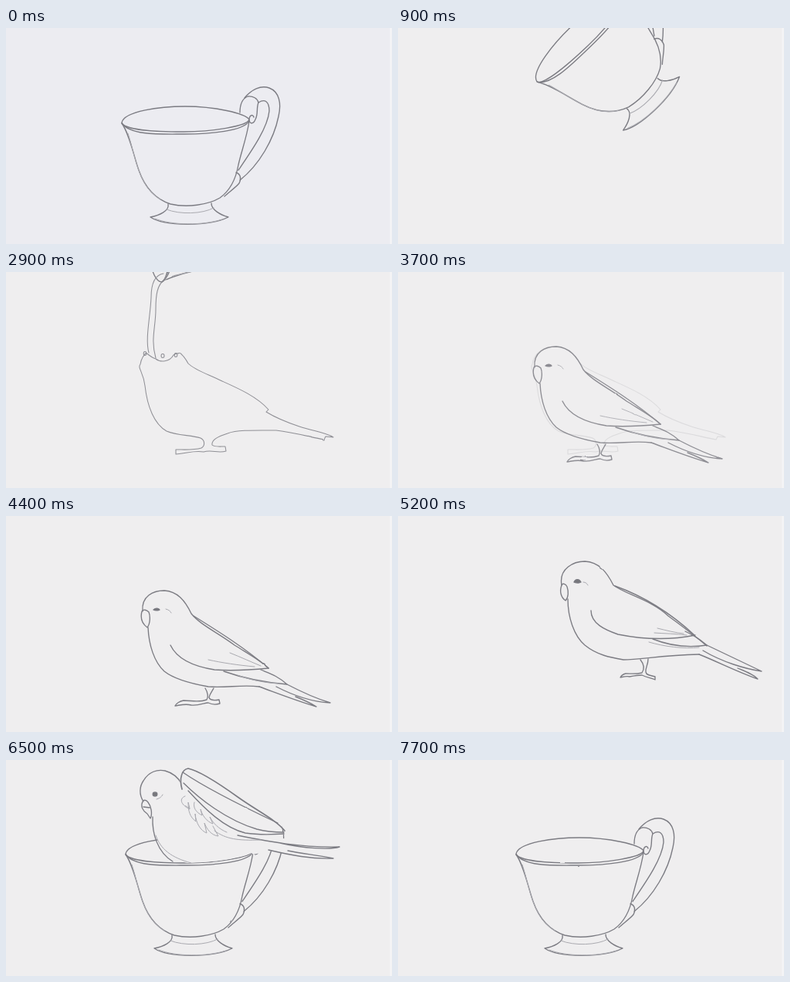
Write an HTML page that moves like this. It is 500 px wide and 281 px high and loops after 7.8 s.

```html
<!DOCTYPE html>
<html lang="en">
<head>
<meta charset="utf-8">
<title>Cup and bird</title>
<style>
html, body { margin: 0; width: 100%; height: 100%; overflow: hidden; background: #efeeef; }
svg { display: block; width: 100vw; height: 100vh; }
path, ellipse { fill: none; stroke: #7b7b82; stroke-width: 1.35; stroke-linecap: round; stroke-linejoin: round; }
.soft { stroke: #a9a9af; stroke-width: 1; }
.thin { stroke: #8f8f95; stroke-width: 1.05; }
.dark { fill: #77777c; }
.paper { fill: #efeeef; stroke: none; }
</style>
</head>
<body>
<svg viewBox="0 0 500 281" preserveAspectRatio="none">
  <defs>
    <filter id="pencil" filterUnits="userSpaceOnUse" x="0" y="0" width="500" height="281" color-interpolation-filters="sRGB">
      <feTurbulence id="grain" type="fractalNoise" baseFrequency=".04" numOctaves="2"/>
      <feDisplacementMap in="SourceGraphic" scale="1.5" xChannelSelector="R" yChannelSelector="G"/>
    </filter>
    <clipPath id="belowSurface"><path id="poolClip"/></clipPath>
    <clipPath id="insideBird"><path id="mouldClip"/></clipPath>
    <clipPath id="streamSpan"><rect id="streamRect" x="100" width="200"/></clipPath>
    <clipPath id="aboveRim"><path d="M0 0H500V140H340L318 121C290 135 190 140 155 125H0Z"/></clipPath>
  </defs>
  <rect id="paper" width="500" height="281"/>
  <path d="M498.5 0V281" style="stroke:#f5f5f7;stroke-width:2"/>
  <g filter="url(#pencil)">
    <g id="cup">
      <path d="M150 123C153 108 200 102 232 102C270 102 310 111 315 119C313 128 265 135 230 135C190 135 152 132 150 123"/>
      <path d="M150 124C162 140 200 138 230 138C265 138 308 134 315 121"/>
      <path d="M150 124C160 138 165 165 172 185C179 205 192 222 213 229C235 234 262 230 277 221C291 211 298 195 301 178C305 160 312 142 315 121"/>
      <path class="soft" d="M158 137C164 155 168 180 177 197C182 208 190 217 200 223"/>
      <path d="M210 229C212 238 198 244 187 246C205 258 262 259 288 246C277 243 266 236 266 228"/>
      <path class="soft" d="M208 236C225 243 255 242 269 234M193 248C215 257 255 257 280 249"/>
      <path d="M309 91C318 80 330 74 341 78C354 83 357 98 353 115C347 145 328 178 303 198"/>
      <path d="M327 97C335 92 341 95 341 108C339 130 318 160 301 185"/>
      <path d="M303 110C303 100 306 92 313 89C320 88 326 92 327 97C324 104 327 112 323 119C320 126 315 125 315 118C316 113 320 112 321 116"/>
      <path d="M298 188C304 190 305 196 302 202C297 208 288 214 283 219"/>
    </g>
    <g id="liquid">
      <g clip-path="url(#belowSurface)"><path id="mould" class="thin"/></g>
      <g clip-path="url(#insideBird)"><path id="surface" class="thin"/></g>
      <g id="bubbles"></g>
    </g>
    <g clip-path="url(#streamSpan)"><path id="stream" class="thin"/></g>
    <g id="bird"></g>
    <g id="perchClip">
      <g id="perch">
        <path class="paper" d="M190 75C174 62 170 40 178 28C185 15 196 12 205 14C216 17 224 24 230 38L330 66L356 74L359 102L432 113L422 128C390 126 370 124 345 118C320 122 280 134 240 135C205 130 189 100 190 75Z"/>
        <path d="M178 54C172 45 173 34 178 27C185 15 196 12 206 14C217 17 224 24 228 32M190 74C189 95 196 120 216 132"/>
        <path class="soft" d="M194 98C200 116 214 127 240 134M203 45C201 49 198 50 195 51"/>
        <path d="M177 54C174 60 177 66 183 70L187 76C190 70 188 60 184 55C181 51 178 52 177 54M178 61L186 62"/>
        <ellipse class="dark" cx="193" cy="44.500" rx="2.800" ry="2.600"/>
        <path d="M300 98C340 106 380 114 432 113C420 117 385 115 355 108M340 117C370 124 395 129 424 128C405 124 385 122 365 118"/>
        <path class="soft" d="M270 92C285 103 300 105 330 104"/>
        <g id="wing">
          <path class="paper" d="M226 36C224 22 228 12 236 11C250 14 275 30 300 48C325 66 350 80 360 97C330 102 295 96 270 80Z"/>
          <path style="stroke-width:1.7" d="M228 38C224 24 228 12 236 11C250 14 275 30 300 48C325 66 350 78 361 92"/>
          <path d="M229 16C255 34 310 62 352 82M230 30C250 50 285 78 325 90C340 94 350 94 360 94M236 40C258 64 282 88 310 95C330 98 345 97 360 96"/>
          <path class="soft" d="M232 47C224 50 226 58 238 64L236 56C236 66 238 74 246 80L245 70C246 82 252 92 260 95L257 82C260 90 266 98 275 99L268 86M244 55C242 62 246 68 254 72L252 64C254 72 260 80 268 83L264 74C268 82 276 90 286 94"/>
        </g>
      </g>
    </g>
  </g>
</svg>
<script>
const LOOP = 7800, STEP = 100;
const $ = id => document.getElementById(id);
const set = (el, attrs) => { for (const k in attrs) el.setAttribute(k, attrs[k]); };
const show = (el, opacity) => set(el, { opacity, display: opacity > 0 ? 'inline' : 'none' });
const lerp = (a, b, k) => a + (b - a) * k;
const span = (t, a, b) => Math.min(1, Math.max(0, (t - a) / (b - a)));
const ease = k => k * k * (3 - 2 * k);

// Blends two paths that share the same commands.
function mix(a, b, k) {
  const ends = b.match(/-?\d+/g);
  let i = 0;
  return a.replace(/-?\d+/g, n => lerp(+n, +ends[i++], k).toFixed(2));
}

// Values along [time, ...values] keys.
function keyed(keys, t, curve = k => k) {
  let i = 0;
  while (i < keys.length - 2 && t >= keys[i + 1][0]) i++;
  const a = keys[i], b = keys[i + 1], k = curve(span(t, a[0], b[0]));
  return a.slice(1).map((v, j) => lerp(v, b[j + 1], k));
}

function add(parent, tag, className = '') {
  const el = document.createElementNS('http://www.w3.org/2000/svg', tag);
  set(el, { class: className });
  return parent.appendChild(el);
}

const head = 'M203 97C188 97 176 106 174 120C170 125 178 130 ';
const low = head + '182 148C186 175 190 198 214 208C230 215 245 214 250 217C256 221 255 229 250 232C240 235 230 232 216 234L214 239C230 236 245 242 256 237C264 240 270 238 272 237L272 233C266 235 262 233 261 230C260 220 272 216 285 216C300 215 312 215 320 216C350 224 375 236 412 236L414 235L421 233C410 231 398 232 380 228C360 220 342 205 330 190L333 186C325 174 300 151 280 142C262 133 245 128 236 119C228 104 218 97 203 97Z';
const full = head + '180 148C183 175 192 198 208 207C222 213 240 212 252 216C258 219 258 226 253 229C243 232 232 231 220 231L220 237C235 236 242 232 256 234C266 231 275 236 285 233L284 227C276 227 270 228 267 225C266 218 275 214 287 210C300 205 325 206 350 206C375 209 395 215 412 218L414 214L424 215C415 209 398 207 380 201C365 196 350 190 337 182L340 179C325 162 300 151 280 142C262 133 245 128 236 119C228 104 218 97 203 97Z';
const calm = 'M150 -8L189 -8L203 -10C212 -1 222 4 250 6C285 7 304 3 312 -5C318 -4 324 -3 345 -4';
const wavy = 'M150 -2L172 -2L180 -8C186 -3 190 0 194 1C200 6 212 5 217 -4C222 -8 225 -4 229 -9L250 -9';

// Each part: class, standing shape, shape after the hop.
const birdParts = [
  ['', 'M177 124C175 104 191 97 205 97C222 98 232 110 240 127C252 142 275 152 296 168C315 180 330 188 340 198',
       'M212 90C208 68 228 59 242 59C260 60 270 72 279 90C295 102 330 110 350 130C370 145 380 152 400 169'],
  ['', 'M176 124C174 132 176 140 183 145C187 140 187 130 185 125C182 122 178 121 176 124',
       'M212 90C209 98 211 106 217 110C221 106 221 98 219 92C217 88 213 87 212 90'],
  ['dark', 'M191 122C194 119 198 120 199 122C196 123 193 123 191 122',
           'M228 86C230 81 235 82 237 86C234 88 231 87 228 86'],
  ['soft', 'M207 121C211 122 213 124 214 126', 'M240 86C243 86 245 88 246 90'],
  ['', 'M184 145C185 168 192 190 205 202C220 214 245 219 262 222C285 224 305 219 328 222',
       'M220 108C220 132 228 156 242 168C258 181 275 184 292 187C315 187 340 181 390 180'],
  ['', 'M213 168C222 187 245 196 270 200C295 202 320 200 340 198',
       'M250 123C250 140 268 148 285 154C315 160 350 162 385 155'],
  ['', 'M243 130C275 150 310 172 340 198', 'M281 91C320 105 355 128 384 155'],
  ['', 'M282 202C310 212 340 217 364 219C352 208 342 205 330 200',
       'M330 160C350 168 375 172 400 168C388 158 382 155 372 150'],
  ['soft', 'M262 187C280 191 300 194 322 196M290 178C305 184 318 190 330 195M300 207C315 213 335 217 352 218',
           'M332 152C345 153 360 153 374 155M336 146C348 149 360 152 370 153M325 164C345 170 370 173 390 171'],
  ['', 'M364 219C385 230 400 237 420 243C400 242 375 235 350 222',
       'M400 168C425 180 450 192 471 202C450 199 420 190 395 175'],
  ['', 'M328 222C350 230 375 240 402 248C392 242 385 239 375 235',
       'M390 180C415 190 440 203 466 212C460 206 452 203 440 198'],
  ['', 'M258 224C262 230 262 236 260 239C250 243 240 240 230 240C225 241 220 244 219 247C226 246 232 244 240 246C250 247 257 243 262 243C268 246 274 245 277 244L276 239C270 240 264 240 263 236C264 231 267 228 269 224',
       'M314 187C318 192 320 198 316 204C308 206 302 205 295 205C291 206 289 208 288 210C293 209 296 208 300 209C305 208 311 207 316 207C322 210 329 211 333 213L333 209C328 207 322 208 321 203C320 198 324 194 324 186']
].map(([cls, stand, hop]) => ({ el: add($('bird'), 'path', cls), stand, hop }));

// Bubbles: low x, low y, high x, high y, relative to the surface.
const bubbles = [[222, -1, 180, -6], [252, -5, 203, -3], [306, 0, 220, -4]]
  .map(place => ({ el: add($('bubbles'), 'ellipse', 'thin'), place }));

const cupKeys = [[200, 150, 124, 0], [1400, 199, 38, -70], [1800, 200, 33, -78.5],
  [2900, 202, 13, -88], [3200, 205, -70, -88]];
const levelKeys = [[1300, 238], [1500, 212], [1800, 183], [2900, 112], [3200, 92]];

function drawCup(t) {
  show($('cup'), t < 3200 || t >= 5500 ? 1 : 0);
  if (t < 3200) {
    const [x, y, turn] = keyed(cupKeys, t, t < 1400 ? ease : undefined);
    set($('cup'), { transform: `translate(${x} ${y}) rotate(${turn}) translate(-150 -124)` });
    return [x, y];
  }
  const x = t < 6500 ? lerp(-370, 5, ease(span(t, 5500, 6100))) : lerp(5, 3, span(t, 6500, 7700));
  set($('cup'), { transform: `translate(${x} -1)` });
}

function drawLiquid(t, level) {
  const k = span(t, 1800, 2900), outline = mix(low, full, k), line = mix(calm, wavy, k);
  const shift = `translate(0 ${level})`;
  show($('liquid'), t < 1300 ? 0 : 1 - span(t, 3300, 3800));
  set($('mould'), { d: outline });
  set($('mouldClip'), { d: outline });
  set($('surface'), { d: line, transform: shift });
  set($('poolClip'), { d: line + 'L500 -4V300H100V-8Z', transform: shift });
  show($('bubbles'), t >= 1500 && t < 3100 ? 1 : 0);
  bubbles.forEach(({ el, place: [x, y, x2, y2] }, i) => set(el, {
    cx: lerp(x, x2, k), cy: level + lerp(y, y2, k), rx: i === 1 ? 2 : lerp(3, 1.8, k), ry: lerp(1.2, 2.5, k)
  }));
}

function drawStream(t, level, [x, y] = [204, -20]) {
  const k = span(t, 1800, 2900), out = lerp(-18, -14, k), end = lerp(191, 185, k);
  const bend = lerp(27, 20, k), wide = lerp(7, 6, k);
  show($('stream'), t >= 1200 && t < 3200 ? 1 : 0);
  const top = lerp(-60, level, span(t, 2900, 3200));
  const bottom = lerp(y, level + 2, span(t, 1100, 1300));
  set($('streamRect'), { y: top, height: Math.max(0, bottom - top) });
  set($('stream'), { d: `M${x + 2} ${y - 11}C${x - 10} ${y - 9} ${x + out} ${y + 5} ${x + out} ${y + bend}
    C${x + out - 1} ${lerp(y, level, .45)} ${end - 5} ${lerp(y, level, .75)} ${end} ${level - 7}
    M${x + 17} ${y - 33}C${x + 13} ${y - 21} ${x + 5} ${y - 8} ${x + 3} ${y - 3}
    C${x - 6} ${y + 4} ${x + out + wide} ${y + 16} ${x + out + wide} ${y + bend + 15}
    C${x + out + wide} ${lerp(y, level, .6)} ${end + 2} ${lerp(y, level, .75)} ${lerp(203, 194, k)} ${level - lerp(10, 0, k)}` });
}

function drawBird(t) {
  const k = ease(span(t, 4500, 5200)), lift = -14 * Math.sin(Math.PI * span(t, 4500, 5200));
  show($('bird'), t < 5600 ? span(t, 3200, 3800) : 0);
  set($('bird'), { transform: `translate(0 ${lift})` });
  for (const { el, stand, hop } of birdParts) set(el, { d: mix(stand, hop, k) });
}

function drawPerch(t) {
  const fly = ease(span(t, 5600, 6400)), away = 1 - fly, sink = ease(span(t, 6600, 7500));
  const y = 46 * away - 25 * Math.sin(Math.PI * fly);
  const size = 1 - .65 * sink;
  show($('perch'), t >= 5600 && t < 7500 ? 1 : 0);
  set($('perchClip'), { 'clip-path': t >= 6400 ? 'url(#aboveRim)' : 'none' });
  set($('perch'), { transform: `translate(${40 * away} ${y + 55 * sink}) translate(235 125) scale(${size}) translate(-235 -125)` });
  const flap = t < 6400 ? .65 + .35 * Math.cos((t - 6400) / 400 * 2 * Math.PI) : 1;
  set($('wing'), { transform: `translate(232 40) scale(1 ${flap}) translate(-232 -40)` });
}

function draw(time) {
  const t = Math.floor(time % LOOP / STEP) * STEP;
  const [level] = keyed(levelKeys, t);
  set($('paper'), { fill: t < 800 ? '#ececf1' : '#efeeef' });
  set($('grain'), { seed: t / STEP + 1 });
  drawStream(t, level, drawCup(t));
  drawLiquid(t, level);
  drawBird(t);
  drawPerch(t);
}

const start = performance.now();
function tick() {
  draw(performance.now() - start);
  requestAnimationFrame(tick);
}
tick();
</script>
</body>
</html>
```
